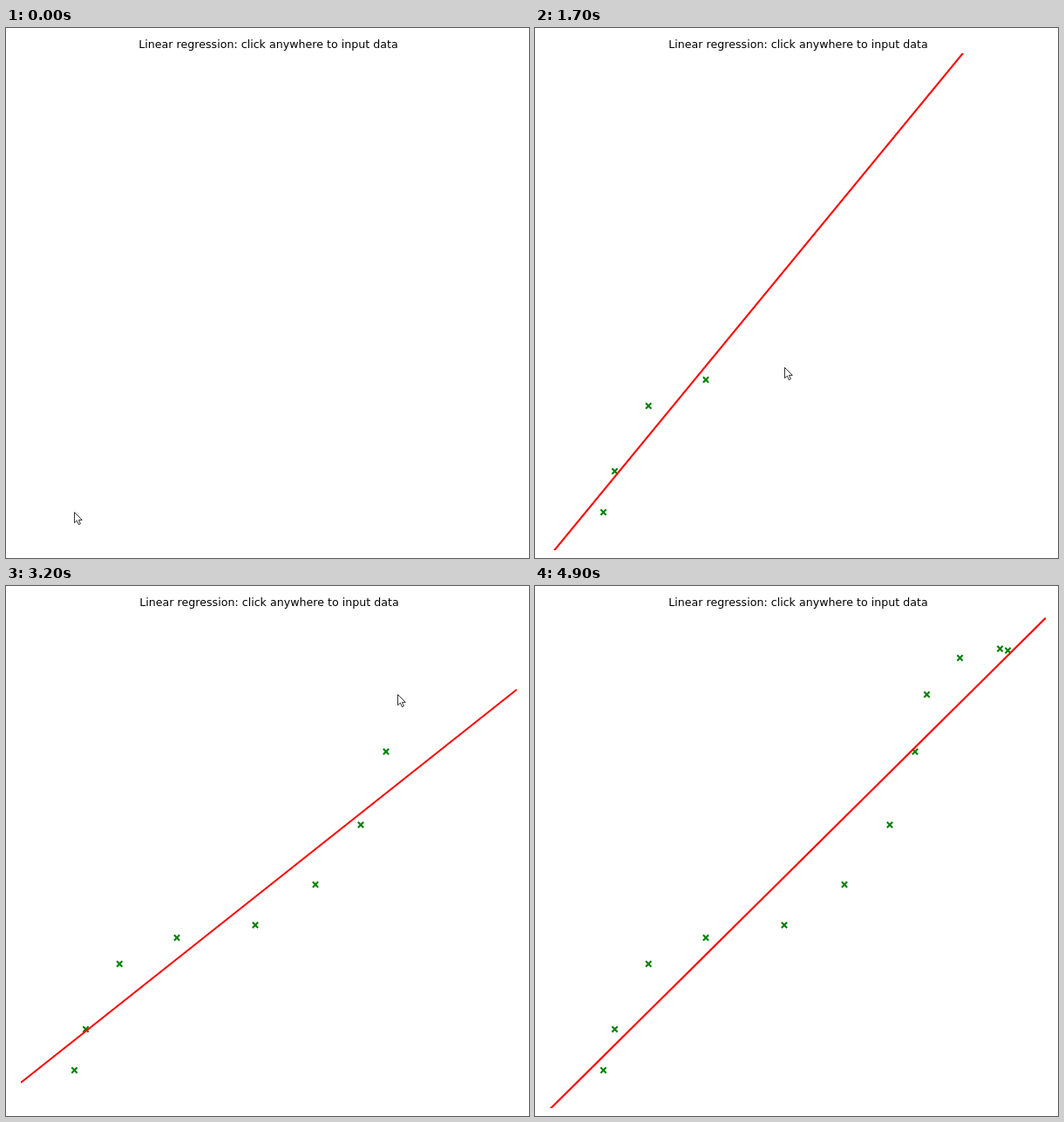
Animation of 600x608 px, one loop 5100 ms. Source, as an HTML page with a canvas:

```html
<!DOCTYPE html>
<html lang="en">
<head>
<meta charset="utf-8">
<title>Linear regression</title>
<style>
  html, body { margin: 0; overflow: hidden; background: #fff; }
  canvas { display: block; }
</style>
</head>
<body>
<canvas id="stage" width="600" height="608"></canvas>
<script>
const LOOP = 5100, STEP = 100;
const LEFT = 17, TOP = 29, RIGHT = 586, BOTTOM = 599;
const ctx = document.getElementById('stage').getContext('2d');
const arrow = new Path2D('M0 0V12.2L2.9 9.6L4.9 14.2L6.9 13.3L5 8.9H8.8Z');

// The clicked data points, and the pointer's way out after the last click.
const data = [
  [78.5, 555.5], [91.5, 508.5], [130.2, 433.5], [196, 403.5], [286, 389], [355, 342.5],
  [407, 274], [436, 190], [449.5, 124.5], [487.5, 82.5], [533.5, 72], [542.5, 74]
];
const rest = [404, 261], exit = [577, 68];

// One click every 380 ms, seen at the next step.
const clickTime = i => 200 + Math.ceil(i * 3.8) * STEP;
const clamp = k => Math.max(0, Math.min(1, k));
const easeOut = k => 1 - (1 - k) ** 2;
const mix = (a, b, k) => a.map((v, i) => v + (b[i] - v) * k);
const mean = values => values.reduce((a, b) => a + b, 0) / values.length;

function fit(points) {
  const mx = mean(points.map(p => p[0])), my = mean(points.map(p => p[1]));
  const sxy = mean(points.map(([x, y]) => (x - mx) * (y - my)));
  const sxx = mean(points.map(([x]) => (x - mx) ** 2));
  return x => my + sxy / sxx * (x - mx);
}

function pointer(t, n) {
  if (n === 0) return data[0];
  const leave = clickTime(n - 1);
  if (n < data.length) {
    const arrive = clickTime(n) - STEP;
    return mix(data[n - 1], data[n], easeOut(clamp((t - leave) / (arrive - leave))));
  }
  return t === leave ? data[n - 1] : mix(rest, exit, clamp((t - leave - 200) / 200));
}

function strokePath(color, ...segments) {
  ctx.beginPath();
  for (const [x1, y1, x2, y2] of segments) {
    ctx.moveTo(x1, y1);
    ctx.lineTo(x2, y2);
  }
  ctx.strokeStyle = color;
  ctx.lineWidth = 2.1;
  ctx.stroke();
}

function drawMarker([x, y], r = 3.15) {
  strokePath('#008000', [x - r, y - r, x + r, y + r], [x - r, y + r, x + r, y - r]);
}

function drawLine(points) {
  const lineAt = fit(points);
  ctx.save();
  ctx.beginPath();
  ctx.rect(LEFT, TOP, RIGHT - LEFT, BOTTOM - TOP);
  ctx.clip();
  strokePath('#f00', [LEFT, lineAt(LEFT), RIGHT, lineAt(RIGHT)]);
  ctx.restore();
}

function drawPointer([x, y]) {
  ctx.save();
  ctx.translate(Math.floor(x) + 0.5, Math.floor(y) + 0.5);
  ctx.fillStyle = '#fff';
  ctx.strokeStyle = '#000';
  ctx.lineWidth = 0.8;
  ctx.fill(arrow);
  ctx.stroke(arrow);
  ctx.restore();
}

function draw(now) {
  const t = Math.floor(now % LOOP / STEP) * STEP;
  const points = data.filter((_, i) => t >= clickTime(i));
  const n = points.length;
  ctx.fillStyle = '#fff';
  ctx.fillRect(0, 0, 600, 608);

  // The title shifts by a pixel with every new fit.
  ctx.fillStyle = '#000';
  ctx.font = '12.65px "DejaVu Sans", sans-serif';
  ctx.textAlign = 'center';
  ctx.fillText('Linear regression: click anywhere to input data', n && n % 2 === 0 ? 302 : 301, 22.5);

  points.forEach(p => drawMarker(p));
  if (n > 1) drawLine(points);
  if (t < LOOP - 200) drawPointer(pointer(t, n));
}

const start = performance.now();
function tick() {
  draw(performance.now() - start);
  requestAnimationFrame(tick);
}
tick();
</script>
</body>
</html>
```
